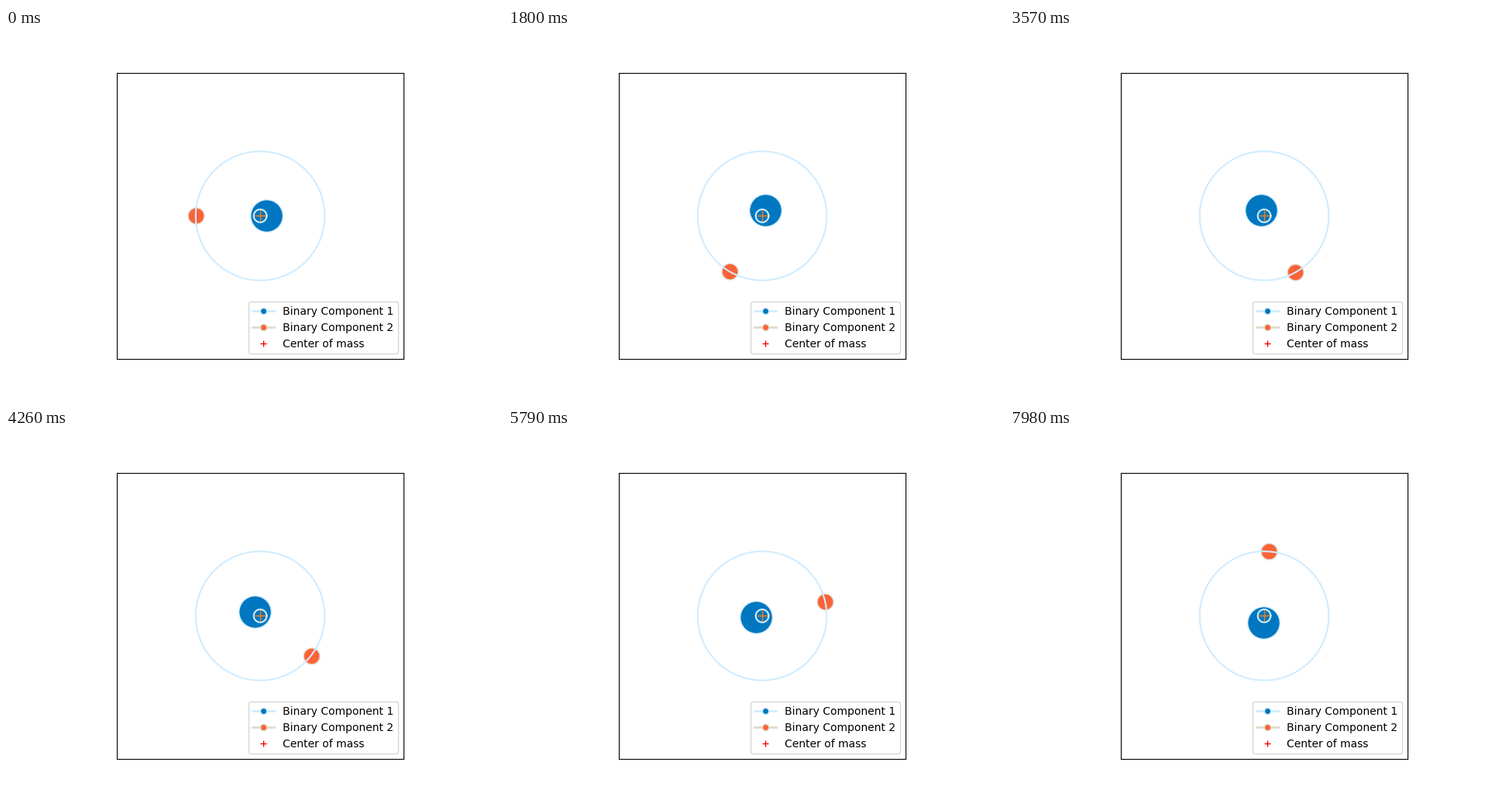
These frames come from a looping animation (640 by 480 pixels, 8 s). A matplotlib script:

```python
import numpy as np
import matplotlib.pyplot as plt
from matplotlib.animation import FuncAnimation

LOOP_MS = 8000
STEPS = 267            # one degree of orbit per step
R1, R2 = 0.1, 1.0      # orbit radii, in inverse ratio to the masses
LIMIT = 2.22

BLUE, PALE_BLUE = "#0077c0", "#d0ecff"
ORANGE, BEIGE = "#fc6238", "#e0dacb"

fig, ax = plt.subplots(figsize=(6.4, 4.8), dpi=100)
ax.set_aspect("equal")
ax.set(xlim=(-LIMIT, LIMIT), ylim=(-LIMIT, LIMIT), xticks=[], yticks=[])


def body(size, face, edge, z):
    return ax.plot([], [], "o", ms=size, mfc=face, mec=edge, mew=1, zorder=z)[0]


def orbit(radius):
    t = np.linspace(0, 2 * np.pi, 361)
    ax.plot(radius * np.cos(t), radius * np.sin(t), color=PALE_BLUE, lw=1.5, zorder=4)


def key(label, face, edge):
    ax.plot([], [], "o-", color=edge, lw=2, ms=6, mfc=face, mec=edge, label=label)


body1 = body(30, BLUE, PALE_BLUE, 2)
body2 = body(15, ORANGE, BEIGE, 3)
orbit(R1)
orbit(R2)
ax.plot(0, 0, "+", color="#ff7f0e", ms=10, mew=1, zorder=5)

key("Binary Component 1", BLUE, PALE_BLUE)
key("Binary Component 2", ORANGE, BEIGE)
ax.plot([], [], "+", color="red", ms=6, label="Center of mass")
ax.legend(loc="lower right")


def update(i):
    a = np.radians(i)
    c, s = np.cos(a), np.sin(a)
    body1.set_data([R1 * c], [R1 * s])
    body2.set_data([-R2 * c], [-R2 * s])
    return body1, body2


anim = FuncAnimation(fig, update, frames=STEPS, interval=LOOP_MS / STEPS,
                     init_func=lambda: update(0), repeat=True, repeat_delay=0)
plt.show()
```
